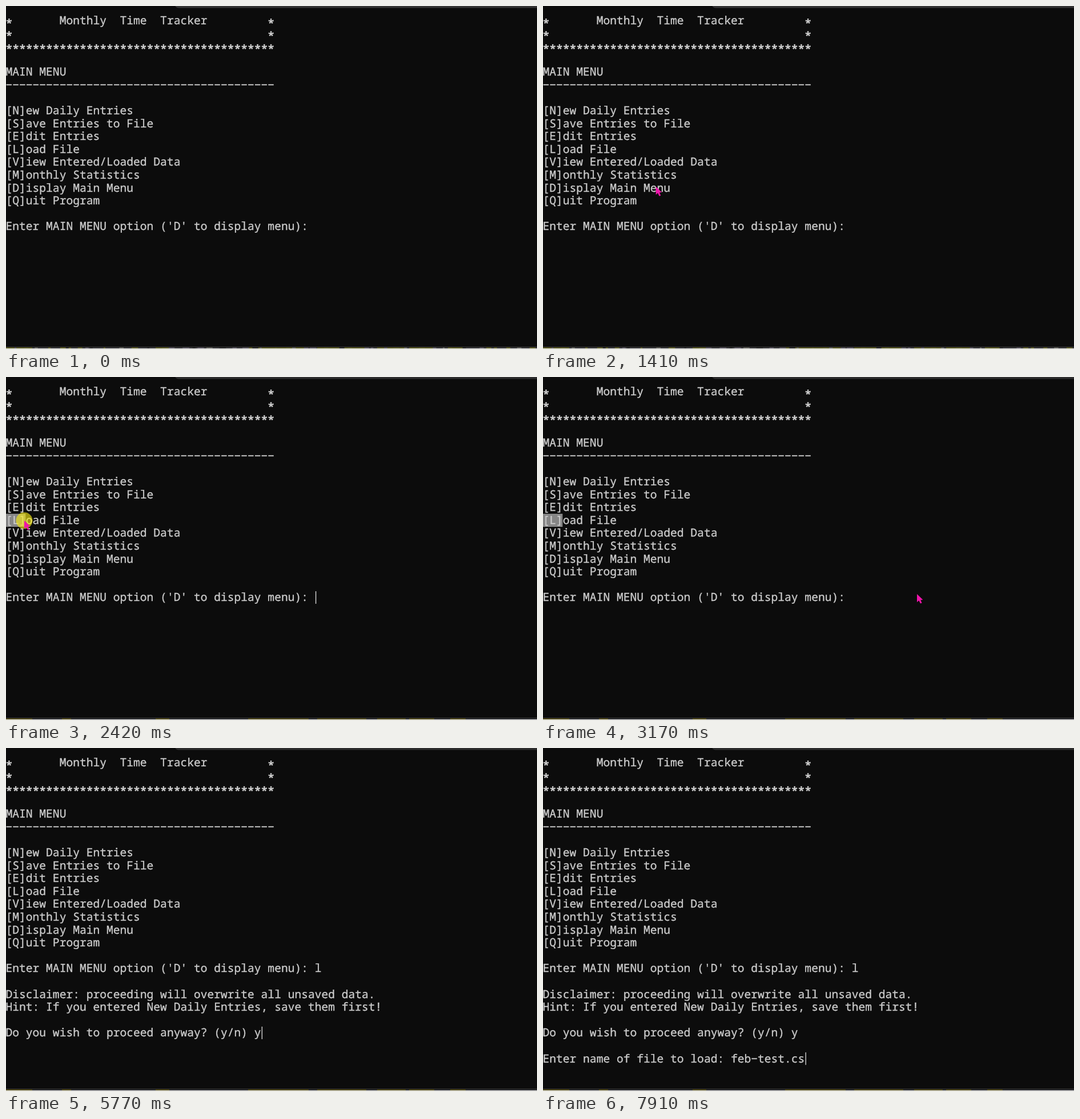
These frames come from a looping animation (930 by 602 pixels, 8 s). An HTML page:

```html
<!DOCTYPE html>
<html lang="en">
<head>
<meta charset="utf-8">
<title>Monthly Time Tracker</title>
<style>
  html, body { margin: 0; width: 100%; height: 100%; overflow: hidden; background: #0c0c0c; }
  svg { display: block; width: 100%; height: 100%; }
  text {
    font: 19.63px "Noto Sans Mono", "DejaVu Sans Mono", monospace;
    font-variant-ligatures: none;
    fill: #ccc; stroke: #ccc; stroke-width: .35px;
    white-space: pre; text-rendering: geometricPrecision;
  }
  .stars { stroke-width: .9px; }
</style>
</head>
<body>
<svg id="stage" viewBox="0 0 930 602">
  <rect width="930" height="602" fill="#0c0c0c"/>
  <rect id="tab" x="296" y="-12" width="650" height="15.6" rx="6"/>
  <g id="edgeBefore"></g>
  <g id="edgeAfter"></g>
  <rect y="601" width="930" height="1" fill="#fff"/>
  <rect id="selection" y="240" height="23" fill="#868686"/>
  <g id="lines"></g>
  <rect id="caret" width="1.3" height="22" fill="#e0e0e0"/>
  <circle id="press" r="14.5" fill="#f4e814" fill-opacity=".64"/>
  <path id="pointer" d="M0 0V14.3L3.3 11.3L6 16.6L8.6 15.4L6.2 10.4L10.4 10Z" fill="#f014ac"/>
</svg>
<script>
const LOOP = 8000, CELL = 11.778, PITCH = 22.6, BASELINE = 31.7;
const $ = id => document.getElementById(id);

function add(parent, tag, attrs) {
  const node = document.createElementNS("http://www.w3.org/2000/svg", tag);
  for (const name in attrs) node.setAttribute(name, attrs[name]);
  return parent.appendChild(node);
}
// The minus sign has the width of the terminal's long hyphen.
const write = (node, text) => { node.textContent = text.replaceAll("-", "\u2212"); };
function addLine(row, text, drop = 0) {
  const node = add($("lines"), "text", { x: -.5, y: BASELINE + row * PITCH + drop });
  write(node, text);
  return node;
}

const screen = [
  "        Monthly  Time  Tracker", "", "", "",
  "MAIN MENU", "-".repeat(40), "",
  "[N]ew Daily Entries", "[S]ave Entries to File", "[E]dit Entries", "[L]oad File",
  "[V]iew Entered/Loaded Data", "[M]onthly Statistics", "[D]isplay Main Menu", "[Q]uit Program"
];
screen.forEach((text, row) => text && addLine(row, text));
const frameLine = "*" + " ".repeat(38) + "*";
[frameLine, frameLine, "*".repeat(40)].forEach((text, row) =>
  addLine(row, text, 4.9).setAttribute("class", "stars"));

// Each prompt: row, text, time shown, answer as [time, characters typed].
const prompts = [
  { row: 16, text: "Enter MAIN MENU option ('D' to display menu): ", from: 0, answer: "l", typed: [[4230, 1]] },
  { row: 18, text: "Disclaimer: proceeding will overwrite all unsaved data.", from: 4700 },
  { row: 19, text: "Hint: If you entered New Daily Entries, save them first!", from: 4700 },
  { row: 21, text: "Do you wish to proceed anyway? (y/n) ", from: 4700, answer: "y", typed: [[5770, 1]] },
  { row: 23, text: "Enter name of file to load: ", from: 6100, answer: "feb-test.csv",
    typed: [[6500, 1], [6570, 3], [6770, 4], [6840, 5], [6910, 6], [7040, 7], [7110, 8],
            [7310, 9], [7840, 10], [7910, 11]] }
];
for (const prompt of prompts) prompt.node = addLine(prompt.row, "");
const caretOn = [[2290, 2950], [3440, 3970], [4230, 5310], [5770, LOOP]];

// Pointer moves: start, steps, destination, ease-out power per axis.
const STEP = 64;
const moves = [
  { at: 330, steps: 8, x: 655, y: 406, ex: 1.3, ey: 1.3 },
  { at: 1070, steps: 12, x: 35, y: 259, ex: 1.93, ey: 1.34 },
  { at: 1890, steps: 3, x: 5, y: 254, ex: 1, ey: 1 },
  { at: 2290, steps: 3, x: 32, y: 252, ex: 1, ey: 1 },
  { at: 2690, steps: 5, x: 667, y: 433, ex: 1.5, ey: 1.3 },
  { at: 3030, steps: 2, x: 655, y: 381, ex: 1, ey: 1 }
];
const entry = { x: 839, y: 571 };
const presses = [[2290, 2620], [3240, 3370]];

const within = (t, spans) => spans.some(([from, to]) => t >= from && t < to);

function pointerAt(t) {
  let { x, y } = entry;
  for (const move of moves) {
    if (t < move.at) break;
    const p = Math.min(1, (Math.floor((t - move.at) / STEP) + 1) / move.steps);
    x += (move.x - x) * (1 - (1 - p) ** move.ex);
    y += (move.y - y) * (1 - (1 - p) ** move.ey);
  }
  return { x, y };
}

// Sliver of the desktop below the window.
function buildEdges() {
  const bar = (group, x, width, fill) => add(group, "rect", { x, y: 599, width, height: 2, fill });
  let seed = 11;
  const random = () => (seed = seed * 16807 % 2147483647) / 2147483647;
  const olive = [[0, 46], [98, 16], [262, 24], [424, 106], [545, 86], [650, 50], [706, 44], [778, 27]];
  for (const [id, base, tint] of [["edgeBefore", "#2c2c2e", "#4c4c14"], ["edgeAfter", "#222326", "#47400f"]]) {
    const group = $(id);
    bar(group, 0, 930, base);
    for (const [x, width] of olive) bar(group, x, width, tint);
    add(group, "rect", { y: 598, width: 930, height: 1, fill: "#3a3a3a" });
  }
  for (let x = 0; x < 930; x += 8 + random() * 22)
    bar($("edgeBefore"), x, 3 + random() * 9, ["#55554f", "#50501a", "#1c1c1c", "#4a4650"][Math.floor(random() * 4)]);
}
buildEdges();

function show(node, visible) { node.style.display = visible ? "" : "none"; }

function draw(t) {
  const late = t >= 2290;
  $("tab").setAttribute("fill", late ? "#2d2d2d" : "#343434");
  show($("edgeBefore"), !late);
  show($("edgeAfter"), late);

  let caretRow = 0, caretColumn = 0;
  for (const { node, row, text, from, answer = "", typed = [] } of prompts) {
    const count = typed.reduce((n, [time, length]) => t >= time ? length : n, 0);
    const line = t >= from ? text + answer.slice(0, count) : "";
    write(node, line);
    if (line) [caretRow, caretColumn] = [row, line.length];
  }
  $("caret").setAttribute("x", caretColumn * CELL + .2);
  $("caret").setAttribute("y", 376 + (caretRow - 16) * PITCH);
  show($("caret"), within(t, caretOn));

  const { x, y } = pointerAt(t);
  $("pointer").setAttribute("transform", `translate(${x} ${y})`);
  show($("pointer"), t >= 330 && t < 4230);
  $("press").setAttribute("cx", x);
  $("press").setAttribute("cy", y);
  show($("press"), within(t, presses));

  const cells = Math.min(3, Math.round(x / CELL));
  $("selection").setAttribute("width", cells * CELL - 1);
  show($("selection"), t >= 2290 && t < 3370);
}

const start = performance.now();
function tick() {
  draw((performance.now() - start) % LOOP);
  requestAnimationFrame(tick);
}
tick();
</script>
</body>
</html>
```
